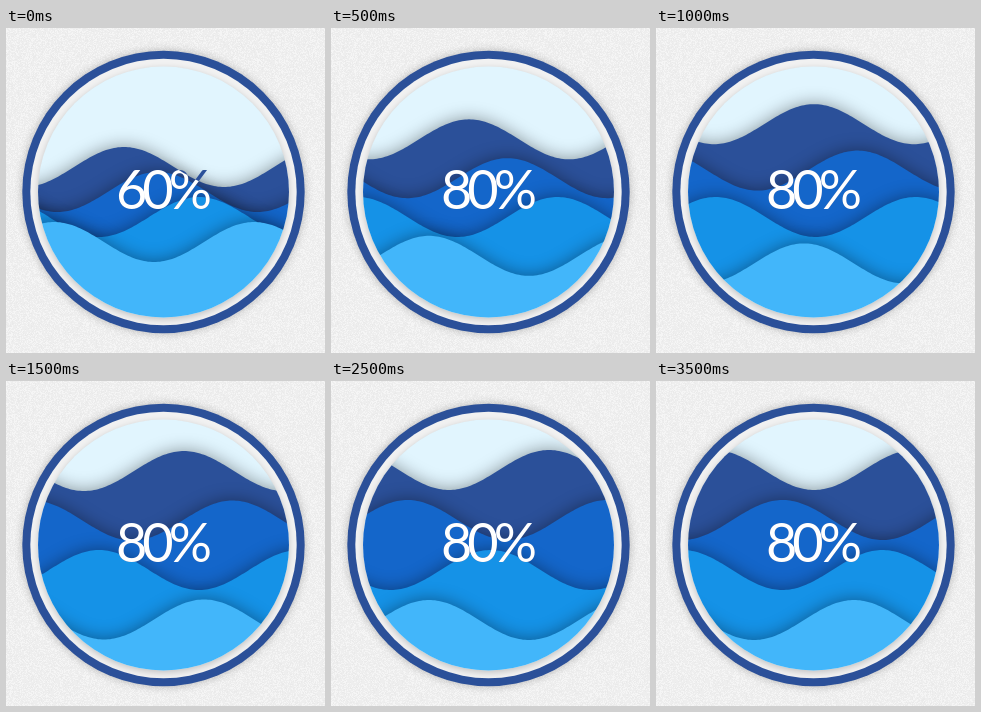
Animation, 319 px wide and 325 px high, one loop 3.75 s. Source, as an HTML page with a canvas:

```html
<!DOCTYPE html>
<html lang="en">
<head>
<meta charset="utf-8">
<title>Water level</title>
<style>
  html, body { margin: 0; width: 100%; height: 100%; overflow: hidden; background: #efefef; }
  canvas { display: block; }
</style>
</head>
<body>
<canvas id="stage" width="319" height="325"></canvas>
<script>
const W = 319, H = 325, LOOP = 3750, STEP = 250;
const CX = 157.5, CY = 164, RADIUS = 125.5, NAVY = '#2b5099', LENGTH = 200, AMP = 20;

// crest: x at the start, period: ms per wavelength, y: settled level, rise: initial offset
const waves = [
  { color: NAVY, crest: 118, period: 5000, y: 89, rise: 50 },
  { color: '#1466ca', crest: 151.5, period: 4000, y: 139, rise: 25 },
  { color: '#1592e7', crest: 193, period: 3000, y: 189, rise: 0 },
  { color: '#42b6fa', crest: 248, period: 2000, y: 239, rise: -25 }
];

function makeLayer() {
  const layer = document.createElement('canvas');
  layer.width = W;
  layer.height = H;
  return layer.getContext('2d');
}

function disc(c, r, color, shadow, blur, drop) {
  c.save();
  c.shadowColor = shadow || 'transparent';
  c.shadowBlur = blur || 0;
  c.shadowOffsetY = drop || 0;
  c.fillStyle = color;
  c.beginPath();
  c.arc(CX, CY, r, 0, 2 * Math.PI);
  c.fill();
  c.restore();
}

function makeBackdrop() {
  const c = makeLayer();
  c.fillStyle = '#eeeeee';
  c.fillRect(0, 0, W, H);
  let seed = 7;
  const random = () => (seed = seed * 16807 % 2147483647) / 2147483647;
  // faint paper grain
  for (let y = 0; y < H; y++) {
    for (let x = 0; x < W; x++) {
      const n = random();
      if (n < 0.45) {
        c.fillStyle = n < 0.3 ? 'rgba(255,255,255,.4)' : 'rgba(0,0,0,.015)';
        c.fillRect(x, y, 1, 1);
      }
    }
  }
  disc(c, 141.2, NAVY, 'rgba(0,0,0,.25)', 8);
  disc(c, 133.2, '#f1f1f1');
  disc(c, RADIUS, '#e1f5fe', 'rgba(0,0,0,.2)', 6, 2);
  return c.canvas;
}

function wavePath(wave, t) {
  const level = wave.y + wave.rise * Math.pow(Math.max(0, 1 - t / 2000), 2.8);
  const crest = wave.crest + LENGTH * t / wave.period;
  const path = new Path2D();
  path.moveTo(0, H + 30);
  for (let x = 0; x <= W; x += 2) {
    path.lineTo(x, level - AMP * Math.cos((x - crest) * 2 * Math.PI / LENGTH));
  }
  path.lineTo(W + 1, H + 30);
  path.closePath();
  return path;
}

function label(c, text, color) {
  c.font = '400 54px Lato, sans-serif';
  c.letterSpacing = '-5px';
  c.fillStyle = color;
  c.fillText(text, 110, 180.5);
}

const ctx = document.getElementById('stage').getContext('2d');
const water = makeLayer();
const backdrop = makeBackdrop();

function draw(t) {
  const text = t < STEP ? '60%' : '80%';
  const paths = waves.map(wave => wavePath(wave, t));

  water.clearRect(0, 0, W, H);
  water.save();
  water.shadowColor = 'rgba(0,0,0,.4)';
  water.shadowBlur = 17;
  waves.forEach((wave, i) => {
    water.fillStyle = wave.color;
    water.fill(paths[i]);
  });
  water.restore();

  // navy above the water, white below its surface
  water.save();
  label(water, text, NAVY);
  water.clip(paths[0]);
  label(water, text, '#fff');
  water.restore();

  // trim everything to the round window in one pass
  water.save();
  water.globalCompositeOperation = 'destination-in';
  disc(water, RADIUS, '#000');
  water.restore();

  ctx.drawImage(backdrop, 0, 0);
  ctx.drawImage(water.canvas, 0, 0);
}

const start = performance.now();
function tick() {
  const t = (performance.now() - start) % LOOP;
  draw(Math.floor(t / STEP) * STEP);
  requestAnimationFrame(tick);
}
tick();
</script>
</body>
</html>
```
